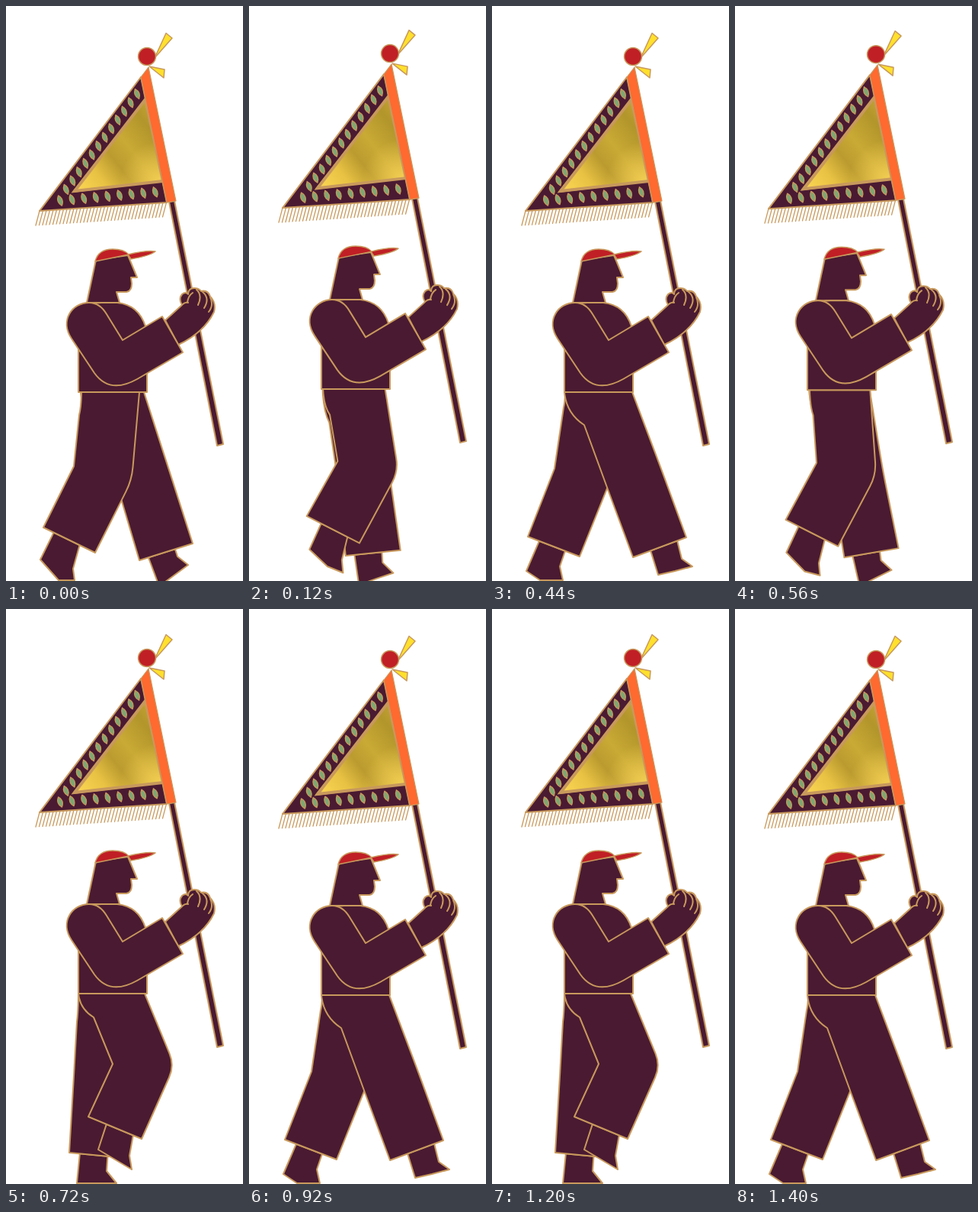
An HTML page for the animation above (1.44 s loop, 311 px wide and 752 px high).

```html
<!DOCTYPE html>
<html lang="en">
<head>
<meta charset="utf-8">
<title>Flag bearer</title>
<style>
  html, body { margin: 0; width: 100%; height: 100%; overflow: hidden; background: #fff; }
  svg { display: block; width: 311px; height: 752px; overflow: hidden; }
  .line { stroke: #c8995c; stroke-width: 2; stroke-linejoin: round; stroke-linecap: round; }
  .dark { fill: #4a1a32; }
  .red { fill: #c01f26; }
  .yellow { fill: #ffe02c; }
  .none { fill: none; }
</style>
</head>
<body>
<svg viewBox="0 0 311 752">
  <defs>
    <linearGradient id="gold" gradientUnits="userSpaceOnUse" x1="95" y1="240" x2="208" y2="150">
      <stop offset="0" stop-color="#fad452"/>
      <stop offset=".22" stop-color="#e8c243"/>
      <stop offset=".42" stop-color="#bb9b2f"/>
      <stop offset=".6" stop-color="#c9aa35"/>
      <stop offset=".85" stop-color="#b2952b"/>
      <stop offset="1" stop-color="#c4a335"/>
    </linearGradient>
    <radialGradient id="shine" gradientUnits="userSpaceOnUse" cx="204" cy="232" r="55">
      <stop offset="0" stop-color="#f6d055"/>
      <stop offset="1" stop-color="#f6d055" stop-opacity="0"/>
    </radialGradient>
    <path id="leaf" d="M0-7Q6 0 0 7Q-6 0 0-7Z" fill="#7ba873" stroke="#c8995c" stroke-width="1.3"/>
  </defs>

  <g class="line dark">
    <path id="farFoot"/>
    <path id="farLeg"/>
    <path id="nearFoot"/>
    <path id="nearLeg"/>
  </g>

  <g id="body" class="line">
    <path class="dark" d="M214 256L221 255L285 573L277 575Z"/>
    <path id="fringe" class="none" stroke-width="1.3" style="stroke-width:1.3"/>
    <path class="dark" d="M177 93L44 268L211 257Z"/>
    <g id="leaves"></g>
    <path fill="url(#gold)" d="M183 122L88 243L206 229Z"/>
    <path fill="url(#shine)" style="stroke-width:4;stroke-linejoin:miter" d="M183 122L90 242L206 229Z"/>
    <path fill="#ff6a30" style="stroke-width:1.2" d="M177 93L187 80L223 255L211 257Z"/>
    <path class="yellow" style="stroke-width:1.5" d="M195 68L210 35.500L218 42ZM188 79L208 83L207 94Z"/>
    <circle class="red" cx="185" cy="66" r="11.500" style="stroke-width:1.500"/>

    <path class="dark" d="M118 332L106 388H149L145 374H158Q165 373 165 363L164 355H172L160 326Z"/>
    <path class="red" style="stroke-width:1.5" d="M117 334Q121 318 140 318Q155 318 161 325ZM160 325Q185 319 196 321Q188 327 164 331Z"/>
    <path class="dark" d="M95 505V420Q95 388 125 388H146Q174 391 183 419L185 440V505Z"/>
    <path class="dark" d="M209 411L231 391Q226 383 231 377Q236 373 239 377Q239 369 247 369Q253 369 256 373Q265 371 268 380Q276 388 273 400Q260 427 226 443Z"/>
    <path class="none" d="M238 388Q239 379 245 375M250 371Q258 378 252 391M258 374Q268 382 260 395M268 381Q273 391 266 400M232 390Q235 387 239 388"/>
    <path class="dark" d="M109 388Q123 388 132 403L153 437L205 406L232 453L172 488Q136 508 116 480L86 435C70 411 87 388 109 388Z"/>
  </g>
</svg>
<script>
const $ = id => document.getElementById(id);

// Stride of one leg: push off, pass, reach, land, stand, trail.
const STRIDE = 960, STEP = 480, TICK = 40, WAIST = 505;
const times = [0, 240, 440, 480, 720, 920];

// waist back x, waist front x, then seat, back knee, cuff back, cuff front, front knee
const legs = [
  [99, 175, 96, 535, 89, 602, 49, 682, 117, 715, 165, 620],
  [95, 182, 115, 534, 140, 595, 108, 664, 178, 693, 221, 597],
  [95, 184, 121, 548, 153, 635, 185, 721, 255, 695, 220, 600],
  [98, 181, 120, 548, 150, 641, 175, 725, 245, 703, 213, 604],
  [95, 170, 93, 540, 89, 611, 83, 711, 156, 718, 160, 610],
  [96, 175, 94, 525, 82, 605, 47, 694, 115, 720, 159, 611]
];

// ankle position along the cuff, then heel, ball, toe, instep
const feet = [
  [.2, 45, 724, 69, 751, 90, 751, 88, 736],
  [.34, 121, 707, 143, 720, 165, 733, 162, 715],
  [.33, 218, 744, 240, 739, 263, 733, 249, 723],
  [.17, 201, 759, 220, 745, 239, 731, 225, 720],
  [.19, 93, 751, 119, 751, 145, 751, 132, 735],
  [.22, 45, 739, 63, 751, 93, 751, 89, 733]
];

const bobTimes = [0, 130, 240, 360, 440];
const bobs = [[0], [-4], [-2], [-.4], [0]];

// Smooth periodic curve through the given poses.
function sample(ts, poses, period, t) {
  const n = ts.length;
  t %= period;
  let i = n - 1;
  while (ts[i] > t) i--;
  const at = k => ts[(k + n) % n] + period * Math.floor(k / n);
  const pose = k => poses[(k + n) % n];
  const span = at(i + 1) - at(i), s = (t - at(i)) / span;
  const slope = (k, c) => (pose(k + 1)[c] - pose(k - 1)[c]) / (at(k + 1) - at(k - 1)) * span;
  return pose(i).map((a, c) => {
    const b = pose(i + 1)[c], d = b - a, m = slope(i, c), q = slope(i + 1, c);
    return a + s * (m + s * (3 * d - 2 * m - q + s * (m + q - 2 * d)));
  });
}

const mix = (a, b, k) => [a[0] + (b[0] - a[0]) * k, a[1] + (b[1] - a[1]) * k];
const toward = (a, b, r) => mix(a, b, r / Math.hypot(b[0] - a[0], b[1] - a[1]));
const pairs = v => v.flatMap((x, i) => i % 2 ? [] : [[x, v[i + 1]]]);

function drawLeg(name, t, bob) {
  const [back, front, ...rest] = sample(times, legs, STRIDE, t);
  const [seat, knee, cuffA, cuffB, cap] = pairs(rest);
  const y = WAIST + bob, a = [back, y], b = [front, y];
  const bend = [back + (seat[0] - back) * .1, y + (seat[1] - y) * .65];
  $(name + 'Leg').setAttribute('d',
    `M${a}Q${bend} ${seat}L${knee}L${cuffA}L${cuffB}L${toward(cap, cuffB, 17)}Q${cap} ${toward(cap, b, 17)}L${b}Z`);

  const [k, ...sole] = sample(times, feet, STRIDE, t);
  const pts = [mix(cuffA, cuffB, k), ...pairs(sole), mix(cuffA, cuffB, k + .5)];
  $(name + 'Foot').setAttribute('d', 'M' + pts.join('L') + 'Z');
}

function leafRow(count, x, y, dx, dy, turn) {
  let out = '';
  for (let i = 0; i < count; i++)
    out += `<use href="#leaf" transform="translate(${x + i * dx} ${y + i * dy}) rotate(${turn})"/>`;
  return out;
}

$('leaves').innerHTML = leafRow(12, 172, 115, -8.47, 11.35, -22) + leafRow(9, 71, 254.5, 15.6, -1.4, -20);

let strands = '';
for (let i = 0; i < 38; i++) strands += `M${44 + i * 4.5} ${268 - i * .3}l-5 19`;
$('fringe').setAttribute('d', strands);

function frame() {
  const t = Math.floor(performance.now() / TICK) * TICK % STEP;
  const [bob] = sample(bobTimes, bobs, STEP, t);
  $('body').setAttribute('transform', `translate(0 ${bob})`);
  drawLeg('near', t, bob);
  drawLeg('far', t + STEP, bob);
  requestAnimationFrame(frame);
}
frame();
</script>
</body>
</html>
```
